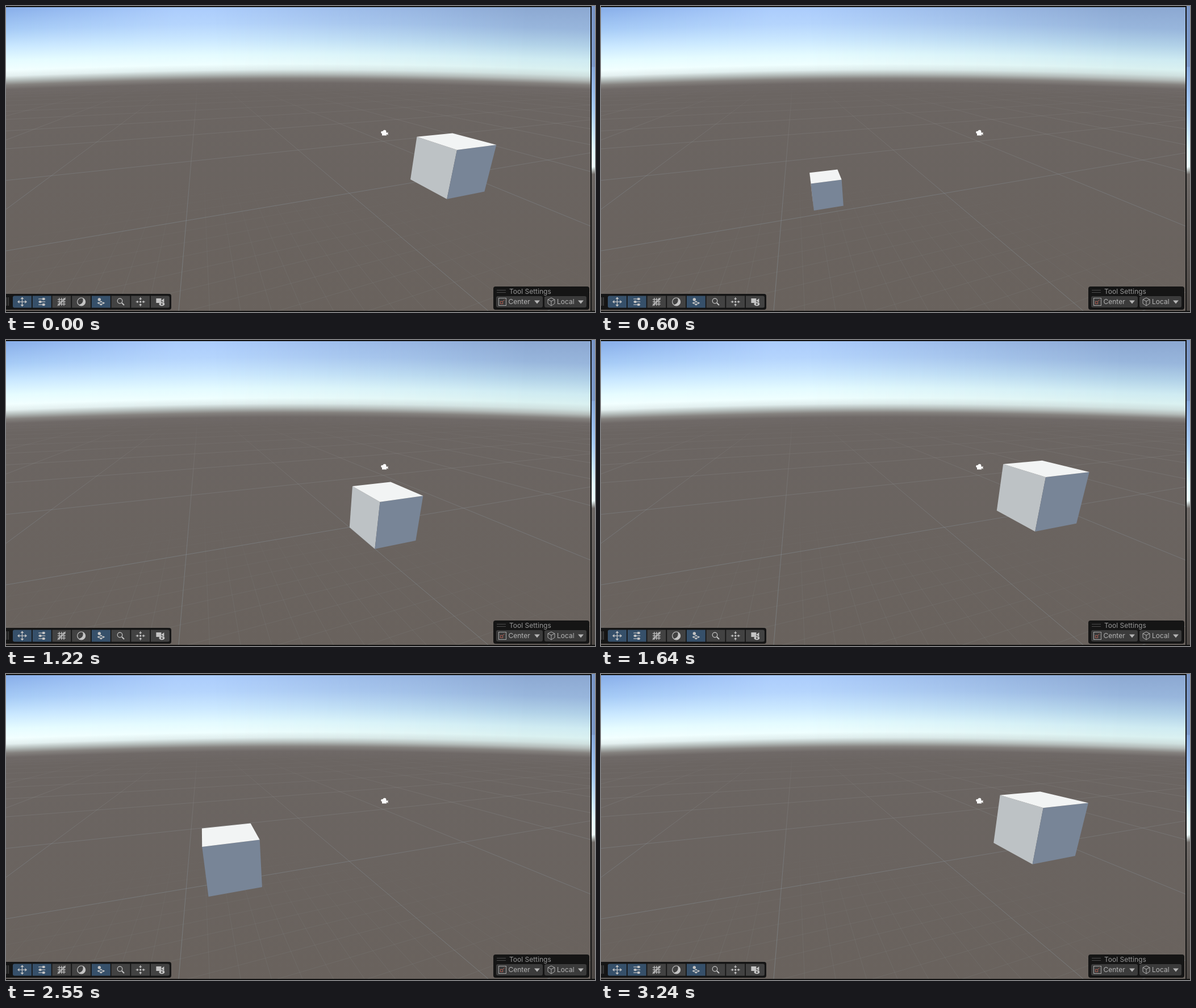
Animation of 1037 by 540 pixels, one loop 3310 ms. Source, as an HTML page with a canvas:

```html
<!DOCTYPE html>
<html>
<head>
<meta charset="utf-8">
<style>
  html, body { margin: 0; width: 100%; height: 100%; overflow: hidden; background: #69635e; }
  canvas { display: block; }
</style>
</head>
<body>
<canvas id="stage" width="1037" height="540"></canvas>
<script>
const W = 1037, H = 540, VIEW = 1029;
const ctx = document.getElementById('stage').getContext('2d');
const backdrop = new OffscreenCanvas(W, H);
const bg = backdrop.getContext('2d');
const ui = new OffscreenCanvas(W, H);
const g = ui.getContext('2d');

// Perspective of the scene view
const FOCAL = 467, CX = 514, CY = 268, HORIZON = 106;
const AXIS_X = [.945, .107, .309], AXIS_Y = [0, .945, -.327], AXIS_Z = [-.327, .309, .893];
const VANISH_X = 1940, VANISH_Z = 340;

// Cube path: time, centre x, centre y, half edge divided by depth
const PERIOD = 1561;
const PATH = [
  [0, 781.5, 278, .0897], [79, 771, 270, .0976], [118, 767, 266, .1003],
  [270, 750, 252, .112], [292, 747, 249, .1145],
  [530, 433, 311, .061], [553, 396.6, 323, .049], [569, 396.6, 323, .0503],
  [639, 396.6, 323, .0562], [989, 396.6, 323, .094], [1072, 396.6, 323, .1025],
  [1199, 626, 311, .0895], [1220, 664.4, 305, .088], [1290, 790, 285, .087],
  [PERIOD, 781.5, 278, .0897]
];

// The picture advances in steps of 70 ms, a few of them 60 ms
const LOOP = 3310, SHORT_STEPS = [2, 4, 6, 12, 44];
const stepTimes = [0];
for (let i = 0; i < 47; i++) stepTimes.push(stepTimes[i] + (SHORT_STEPS.includes(i) ? 60 : 70));

const lerp = (a, b, u) => a + (b - a) * u;
const clamp01 = v => Math.max(0, Math.min(1, v));
const rgb = hex => [1, 3, 5].map(i => parseInt(hex.substr(i, 2), 16));

function line(c, x1, y1, x2, y2) {
  c.beginPath();
  c.moveTo(x1, y1);
  c.lineTo(x2, y2);
  c.stroke();
}

function polygon(c, points, color) {
  c.fillStyle = color;
  c.beginPath();
  points.forEach(p => c.lineTo(p[0], p[1]));
  c.closePath();
  c.fill();
}

function disc(c, x, y, r) {
  c.beginPath();
  c.arc(x, y, r, 0, Math.PI * 2);
  c.fill();
}

function panel(x, y, w, h, r, color) {
  g.fillStyle = color;
  g.beginPath();
  g.roundRect(x, y, w, h, r);
  g.fill();
}

function drawSky() {
  const heights = [0, 30, 60, 85, 102, 112, 120, 128, 136, 152, 540];
  const ground = ['#b4bcba', '#85827f', '#6f6967', '#6b6562', '#69625d'];
  const bands = [
    ['#86ace8', '#a6cbf6', '#cae8ff', '#e6fcff', '#f2ffff', '#e4f0f0'],
    ['#aacbfc', '#b5d5fd', '#cce9ff', '#e4fbff', '#efffff', '#e0eeee'],
    ['#8ba7d1', '#98b6dc', '#b2d2e8', '#cfebf2', '#daf1f1', '#cfe0df']
  ].map(band => band.concat(ground).map(rgb));
  for (let x = 0; x < VIEW; x++) {
    const bend = 26 * (Math.hypot(1, (x - CX) / 495) - 1);
    const left = x < 300;
    const u = left ? x / 300 : clamp01((x - 360) / 560);
    const [a, b] = left ? [bands[0], bands[1]] : [bands[1], bands[2]];
    const fill = bg.createLinearGradient(0, 0, 0, H);
    heights.forEach((y, i) => {
      const color = a[i].map((v, k) => Math.round(lerp(v, b[i][k], u)));
      const shifted = y === 0 || y === H ? y : y + bend;
      fill.addColorStop(shifted / H, `rgb(${color})`);
    });
    bg.fillStyle = fill;
    bg.fillRect(x, 0, 1, H);
  }
}

function gridLines(cell, from, to) {
  for (let i = from; i <= to; i++) {
    const inverse = .003067 + .00189 * cell * i;
    if (inverse > .0005) line(bg, 0, HORIZON + 1 / inverse, VANISH_X, HORIZON);
  }
  for (let i = from * 3; i <= to * 3; i++)
    line(bg, VANISH_Z, HORIZON, 304 + 545 * cell * i, 538);
}

function drawGrid() {
  bg.save();
  bg.beginPath();
  bg.rect(0, 146, VIEW, H);
  bg.clip();
  bg.lineWidth = 1;
  const far = bg.createLinearGradient(0, 140, 0, 330);
  far.addColorStop(0, 'rgba(150,150,150,0)');
  far.addColorStop(.35, 'rgba(150,152,152,.2)');
  far.addColorStop(1, 'rgba(140,154,164,.34)');
  bg.strokeStyle = far;
  gridLines(1, -1, 10);
  const near = bg.createRadialGradient(470, 1450, 1000, 470, 1450, 1150);
  near.addColorStop(0, 'rgba(135,145,145,.17)');
  near.addColorStop(1, 'rgba(135,145,145,0)');
  bg.strokeStyle = near;
  gridLines(.1, -12, 16);
  bg.restore();
}

function drawFrame() {
  const strip = bg.createLinearGradient(0, 0, 0, H);
  [[0, '#7894c4'], [.198, '#7c99c9'], [.2, '#86a8dc'], [.34, '#a9cdf8'], [.47, '#e4faff'],
   [.525, '#eefcfc'], [.55, '#6e6966'], [1, '#4b4643']].forEach(s => strip.addColorStop(...s));
  bg.fillStyle = strip;
  bg.fillRect(1031, 0, 6, H);
  bg.fillStyle = '#121212';
  bg.fillRect(0, 0, VIEW, 2);
  bg.fillRect(VIEW, 0, 2, H);
  bg.fillRect(0, 538, W, 2);
}

// Toolbar icons, drawn around their own centre
const ICONS = [
  () => {
    line(g, -7, 0, 7, 0);
    line(g, 0, -7, 0, 7);
    for (let i = 0; i < 4; i++) {
      g.rotate(Math.PI / 2);
      polygon(g, [[8.5, 0], [5, -3], [5, 3]], '#c4c4c4');
    }
  },
  () => {
    [-5, 0, 5].forEach((y, i) => {
      line(g, -6, y, 6, y);
      g.fillRect(i === 1 ? -5 : 1, y - 2, 4, 4);
    });
  },
  () => {
    [-4, 0, 4].forEach(v => { line(g, v, -7, v, 7); line(g, -7, v, 7, v); });
    line(g, -7, 7, 7, -7);
  },
  () => {
    g.beginPath();
    g.arc(0, 0, 7, 0, 7);
    g.stroke();
    g.beginPath();
    g.arc(0, 0, 7, -1.2, 2.3);
    g.quadraticCurveTo(5, 3, 2.5, -6.5);
    g.fill();
  },
  () => {
    disc(g, -3, -4, 2.7);
    polygon(g, [[-7, 2], [0, -1.5], [7, 2], [0, 6.5]], '#c4c4c4');
    g.strokeStyle = '#36506a';
    line(g, -3.5, 0, 3.5, 4.2);
    line(g, 3.5, 0, -3.5, 4.2);
  },
  () => {
    g.beginPath();
    g.arc(-1.5, -1.5, 4.3, 0, 7);
    g.stroke();
    g.lineWidth = 2;
    line(g, 2, 2, 6, 6);
  },
  () => {
    disc(g, 0, 0, 1.7);
    for (let i = 0; i < 4; i++) {
      g.rotate(Math.PI / 2);
      line(g, 4, 0, 8, 0);
      polygon(g, [[3, 0], [6, -2.6], [6, 2.6]], '#c4c4c4');
    }
  },
  () => {
    g.fillRect(-7, -6, 9, 8);
    polygon(g, [[2, -2], [7, -6], [7, 2]], '#c4c4c4');
    g.beginPath();
    g.ellipse(3, 4, 5, 3.3, 0, 0, 7);
    g.fill();
    g.fillStyle = '#424242';
    disc(g, 3, 4, 1.5);
  }
];

function drawToolbar() {
  panel(-5, 508, 296, 28, 4, '#151515');
  g.fillStyle = '#555';
  g.fillRect(1, 514, 1, 15);
  g.fillRect(4, 514, 1, 15);
  ICONS.forEach((icon, i) => {
    const x = 12 + 34.7 * i;
    panel(x, 511.5, 33, 21, i === 0 ? [3, 0, 0, 3] : i === 7 ? [0, 3, 3, 0] : 0,
      [0, 1, 4].includes(i) ? '#36506a' : '#424242');
    g.save();
    g.translate(x + 16.5, 522);
    g.strokeStyle = g.fillStyle = '#c4c4c4';
    g.lineWidth = 1.2;
    icon();
    g.restore();
  });
}

function dropdown(x, w, label, textX) {
  panel(x, 512, w, 20, 3, '#3b3b3b');
  g.fillStyle = '#b4b4b4';
  g.fillText(label, textX, 522.5);
  const right = x + w;
  polygon(g, [[right - 15, 519.5], [right - 5, 519.5], [right - 10, 525.5]], '#b4b4b4');
}

function drawToolSettings() {
  panel(858, 495, 169, 41, 4, '#151515');
  g.font = '12px Inter, sans-serif';
  g.textBaseline = 'middle';
  g.fillStyle = '#989898';
  g.fillText('Tool Settings', 886, 504);
  g.fillStyle = '#4c4c4c';
  g.fillRect(864, 501, 16, 1);
  g.fillRect(864, 505, 16, 1);
  dropdown(863, 82, 'Center', 884.5);
  dropdown(948, 74, 'Local', 970);

  g.lineWidth = 1;
  g.strokeStyle = '#a8a8a8';
  g.strokeRect(867.5, 515.5, 13, 13);
  g.strokeStyle = '#a0584e';
  g.strokeRect(870.5, 521.5, 4, 4);
  line(g, 874, 522, 878, 518);

  g.strokeStyle = '#b0b0b0';
  g.beginPath();
  [[960, 515], [966, 518], [966, 525], [960, 529], [954, 525], [954, 518]].forEach(p => g.lineTo(...p));
  g.closePath();
  g.stroke();
  line(g, 954, 518, 960, 521);
  line(g, 966, 518, 960, 521);
  line(g, 960, 521, 960, 529);
}

function drawCameraGizmo() {
  g.fillStyle = '#fbfbfb';
  disc(g, 666.5, 221.5, 2.8);
  disc(g, 662.5, 223, 2.3);
  g.fillRect(662, 222.5, 8, 6);
  polygon(g, [[669, 225], [672.5, 222.5], [672.5, 228]], '#fbfbfb');
}

function poseAt(time) {
  const t = time % PERIOD;
  const i = PATH.findIndex(key => key[0] > t);
  const a = PATH[i - 1], b = PATH[i];
  return a.map((v, k) => lerp(v, b[k], (t - a[0]) / (b[0] - a[0]))).slice(1);
}

function drawCube([x, y, half]) {
  const centre = [(x - CX) / FOCAL, (CY - y) / FOCAL, 1];
  const corner = (sx, sy, sz) => {
    const p = centre.map((v, k) => v + half * (sx * AXIS_X[k] + sy * AXIS_Y[k] + sz * AXIS_Z[k]));
    return [CX + FOCAL * p[0] / p[2], CY - FOCAL * p[1] / p[2]];
  };
  const face = (corners, color) => {
    const points = corners.map(c => corner(...c));
    const [a, b, c] = points;
    const turn = (b[0] - a[0]) * (c[1] - a[1]) - (b[1] - a[1]) * (c[0] - a[0]);
    if (turn > 0) polygon(ctx, points, color);
  };
  face([[-1, 1, 1], [-1, 1, -1], [-1, -1, -1], [-1, -1, 1]], '#bdc2c5');
  face([[-1, 1, -1], [1, 1, -1], [1, -1, -1], [-1, -1, -1]], '#788597');
  face([[-1, 1, 1], [1, 1, 1], [1, 1, -1], [-1, 1, -1]], '#f2f4f4');
}

function draw(now) {
  const t = now % LOOP;
  const shown = stepTimes.findLast(start => start <= t) ?? 0;
  ctx.drawImage(backdrop, 0, 0);
  drawCube(poseAt(shown));
  ctx.drawImage(ui, 0, 0);
  requestAnimationFrame(() => draw(performance.now() - startTime));
}

drawSky();
drawGrid();
drawFrame();
drawToolbar();
drawToolSettings();
drawCameraGizmo();
const startTime = performance.now();
draw(0);
</script>
</body>
</html>
```
